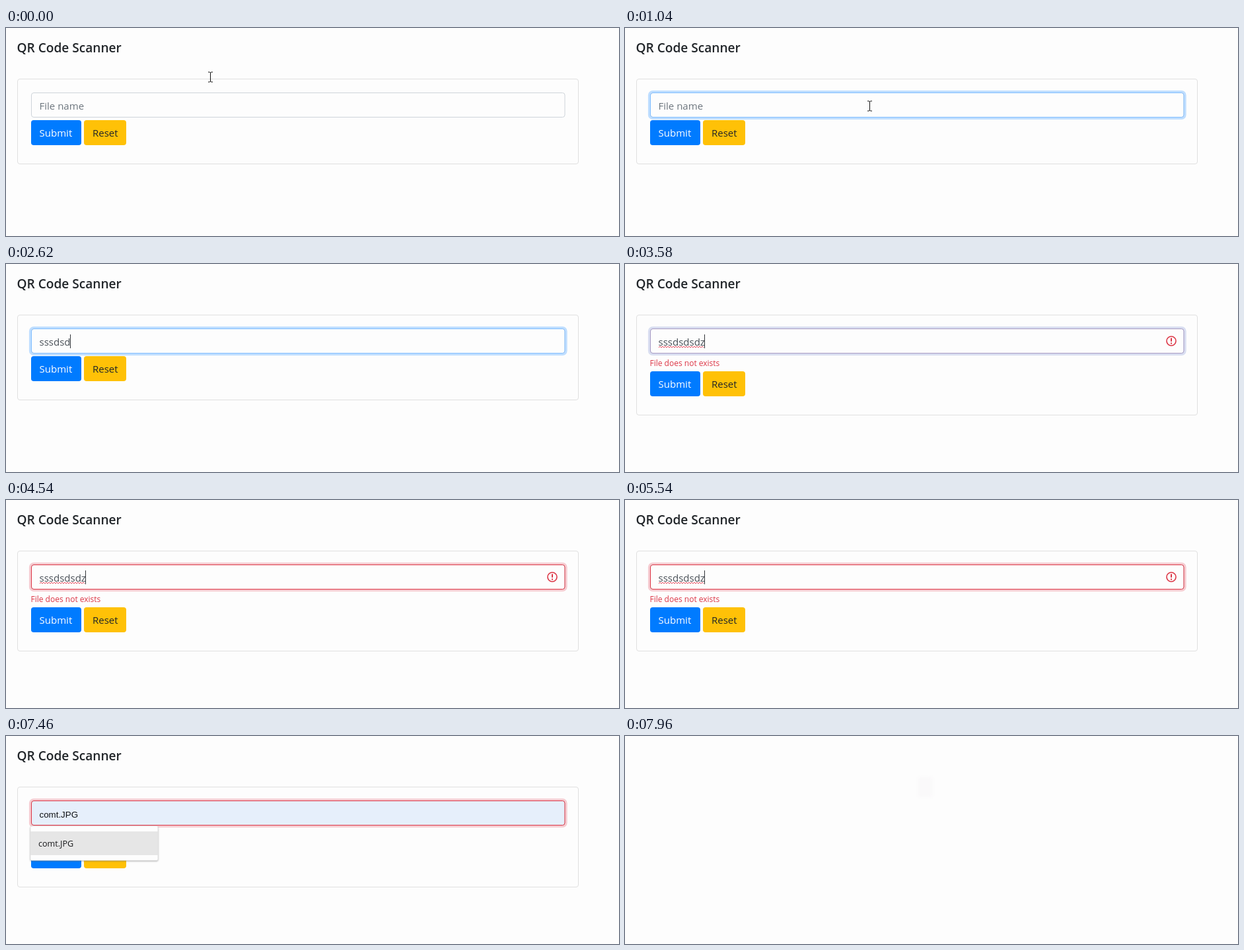
An HTML page that plays this animation: 928x316 px, repeating every 8 s.

```html
<!DOCTYPE html>
<html lang="en">
<head>
<meta charset="utf-8">
<title>QR Code Scanner</title>
<style>
  html, body { margin: 0; width: 100%; height: 100%; overflow: hidden; background: #fdfdfd; }
  svg { display: block; width: 100%; height: 100%; }
  text { font: 15px "Open Sans", "Noto Sans", sans-serif; white-space: pre; }
  .title { font-size: 19.1px; font-weight: 600; fill: #212529; }
  .value { fill: #495057; }
  .hint { fill: #6c757d; }
  .preview { font: 13.33px "Liberation Sans", Arial, sans-serif; fill: #101214; }
  .error { font-size: 12px; fill: #dc3545; }
  .item { font-size: 12.6px; font-weight: 500; fill: #18191b; }
</style>
</head>
<body>
<svg viewBox="0 0 928 316">
  <defs>
    <filter id="shadow" x="-10%" y="-10%" width="120%" height="125%">
      <feDropShadow dx="0" dy="1" stdDeviation="1" flood-color="#606060" flood-opacity=".55"/>
    </filter>
    <filter id="soft"><feGaussianBlur stdDeviation="2"/></filter>
  </defs>
  <rect width="928" height="316" fill="#fdfdfd"/>
  <g id="page">
    <text class="title" x="16.5" y="37">QR Code Scanner</text>
    <rect id="panel" x="17.5" y="77.5" width="849" height="129" rx="3.5" fill="none" stroke="#e0e0e0"/>
    <g id="buttons">
      <rect x="38" y="140" width="76" height="38" rx="4" fill="#007bff"/>
      <text x="50.5" y="165" fill="#fff">Submit</text>
      <rect x="118" y="140" width="64" height="38" rx="4" fill="#ffc107"/>
      <text x="131" y="165" fill="#212529">Reset</text>
    </g>
    <text id="error" class="error" x="37.5" y="155">File does not exists</text>
    <rect id="field" x="38.5" y="98.5" width="807.5" height="37" rx="3.5" stroke="#ced4da"/>
    <g id="blue" fill="none">
      <rect x="36.5" y="96.5" width="811.5" height="41" rx="5.5" stroke="#bfdeff" stroke-width="3.2"/>
      <rect x="38.5" y="98.5" width="807.5" height="37" rx="3.5" stroke="#80bdff"/>
    </g>
    <g id="red" fill="none">
      <rect x="36.5" y="96.5" width="811.5" height="41" rx="5.5" stroke="#f6ccd1" stroke-width="3.2"/>
      <rect x="38.5" y="98.5" width="807.5" height="37" rx="3.5" stroke="#dc3545"/>
    </g>
    <g id="icon" fill="none" stroke="#dc3545" stroke-width="1.6">
      <circle cx="827" cy="117" r="7"/>
      <path d="M827 112.6v5.2M827 119.6v1.8" stroke-width="2"/>
    </g>
    <text id="hint" class="hint" x="50.5" y="123.5">File name</text>
    <text id="value" class="value" x="50.5" y="123.5"></text>
    <path id="squiggle" fill="none" stroke="#e8485a"/>
    <path id="caret" stroke="#32363a"/>
    <text id="preview" class="preview" x="50.5" y="124">comt.JPG</text>
    <g id="menu">
      <rect id="menuBox" x="37" y="137" width="193" fill="#fdfdfd" stroke="#dcdcdc" stroke-width=".6" rx="2" filter="url(#shadow)"/>
      <rect id="active" x="37" y="145" width="193" height="36" fill="#e6e6e6"/>
      <g id="items"></g>
    </g>
    <path id="pointer" d="M-3.5-7.5h2.5l1 1 1-1h2.5M0-6.5v13M-3.5 7.5h2.5l1-1 1 1h2.5" fill="none" stroke="#101010"/>
  </g>
  <rect id="ghost" x="443" y="62" width="23" height="31" rx="4" fill="#faf9fa" filter="url(#soft)"/>
</svg>
<script>
const LOOP = 8000;
const el = {};
document.querySelectorAll('[id]').forEach(n => el[n.id] = n);

// Each row holds a start time and the state from then on.
const typed = [
  [0, ''], [1880, 's'], [2150, 'ss'], [2270, 'sss'], [2400, 'sssd'], [2500, 'sssds'],
  [2580, 'sssdsd'], [2690, 'sssdsds'], [2770, 'sssdsdsd'], [3190, 'sssdsdsdz'],
  [6310, 'c'], [7000, 'co'], [7230, ''], [7540, 'comt.JPG']
];
const menus = [
  [0, []],
  [1290, ['comt.JPG', 'sd', 'cxccxcxc', 'send mail', 'sssdsd']],
  [1900, ['sd', 'send mail']],
  [2150, []],
  [6380, ['comt.JPG', 'cxccxcxc']],
  [7000, ['comt.JPG']],
  [7540, []]
];
const path = [[0, 309, 74], [120, 311, 72], [540, 352, 112], [810, 364, 117], [1040, 370, 118]];
const FOCUS = 540, FAIL = 3540, PREVIEW = 7230, ACCEPT = 7540, CLEAR = 7740;

const clamp = x => Math.max(0, Math.min(1, x));
const at = (rows, t) => rows.filter(r => r[0] <= t).pop();
const show = (node, on) => node.setAttribute('visibility', on ? 'inherit' : 'hidden');
const fade = (node, a) => node.setAttribute('opacity', a);

function setMenu(list) {
  show(el.menu, list.length > 0);
  const key = list.join();
  if (el.items.dataset.key === key) return;
  el.items.dataset.key = key;
  el.menuBox.setAttribute('height', list.length * 36 + 16);
  el.items.innerHTML = list.map((s, i) =>
    `<text class="item" x="49" y="${167.5 + i * 36}">${s}</text>`).join('');
}

function movePointer(t) {
  const i = Math.max(0, path.findLastIndex(p => p[0] <= t));
  const a = path[i], b = path[i + 1] || a;
  const k = clamp((t - a[0]) / (b[0] - a[0] || 1));
  const e = k * k * (3 - 2 * k);
  const x = Math.round(a[1] + (b[1] - a[1]) * e) + .5;
  const y = Math.round(a[2] + (b[2] - a[2]) * e) + .5;
  el.pointer.setAttribute('transform', `translate(${x} ${y})`);
  show(el.pointer, t < 1880);
}

function caretOn(t, since) {
  if (t < FOCUS || t >= PREVIEW && t < ACCEPT) return false;
  const start = t >= 3500 && t < 6310 ? 3500 : Math.max(FOCUS, since);
  return Math.floor((t - start) / 500) % 2 === 0;
}

function render(t) {
  const [since, text] = at(typed, t);
  const failed = t >= FAIL;
  const previewing = t >= PREVIEW && t < ACCEPT;

  el.value.textContent = text;
  const end = text ? 50.5 + el.value.getComputedTextLength() : 50.5;
  show(el.hint, !text && !previewing);
  show(el.preview, previewing);
  el.field.setAttribute('fill', t >= PREVIEW ? '#e6effb' : '#fdfdfd');

  const red = clamp((t - FAIL) / 150);
  fade(el.blue, clamp((t - FOCUS) / 150) * (1 - red));
  fade(el.red, red);
  show(el.icon, failed && !previewing);
  show(el.error, failed);
  el.buttons.setAttribute('transform', `translate(0 ${failed ? 23 : 0})`);
  el.panel.setAttribute('height', failed ? 152 : 129);

  const misspelt = failed && t < 6310;
  show(el.squiggle, misspelt);
  if (misspelt) {
    let d = 'M51 127';
    for (let x = 51, up = true; x + 2 <= end; x += 2, up = !up) d += up ? 'l2-2' : 'l2 2';
    el.squiggle.setAttribute('d', d);
  }

  el.caret.setAttribute('d', `M${Math.floor(end) + .5} 107v21`);
  show(el.caret, caretOn(t, since));
  setMenu(at(menus, t)[1]);
  show(el.active, previewing);
  movePointer(t);

  show(el.page, t < CLEAR);
  show(el.ghost, t >= 7810);
}

function tick(now) {
  render(now % LOOP);
  requestAnimationFrame(tick);
}
render(0);
requestAnimationFrame(tick);
</script>
</body>
</html>
```
